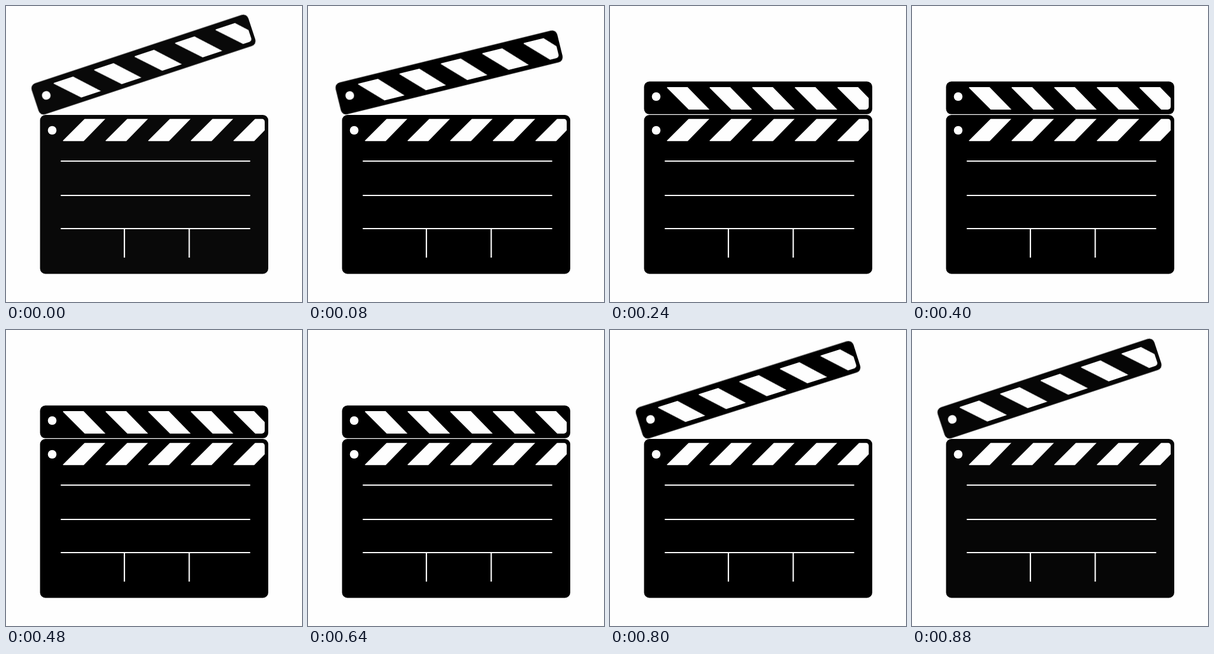
An HTML page without scripts that plays this animation: 500 px wide and 500 px high, repeating every 960 ms.

```html
<!DOCTYPE html>
<html lang="en">
<head>
<meta charset="utf-8">
<title>Clapperboard</title>
<style>
  html, body { margin: 0; width: 100%; height: 100%; overflow: hidden; background: #fefefe; }
  svg { display: block; width: 100%; height: 100%; }
  .board { fill: #000; animation: tone 960ms step-end infinite; }
  .white { fill: #fefefe; }
  .rules { fill: none; stroke: #fefefe; stroke-width: 2.2; }
  .arm { transform-origin: 66.8px 183px; animation: clap 960ms step-end infinite; }

  @keyframes clap {
    0%       { transform: rotate(-18.3deg); }
    8.3333%  { transform: rotate(-13.8deg); }
    16.6667% { transform: translateY(-.8px); }
    25%      { transform: none; }
    75%      { transform: rotate(-14.2deg); }
    83.3333% { transform: rotate(-17.6deg); }
    91.6667%, 100% { transform: rotate(-18.3deg); }
  }
  @keyframes tone {
    0%       { fill: #090909; }
    8.3333%  { fill: #000; }
    91.6667%, 100% { fill: #060606; }
  }
</style>
</head>
<body>
<svg viewBox="0 0 500 500">
  <defs>
    <clipPath id="inset"><rect x="90" y="137" width="347" height="38" rx="5"/></clipPath>
    <path id="stripe" d="M97 137H131L168 175H133L96 138Z"/>
    <g id="stripes" class="white" clip-path="url(#inset)">
      <use href="#stripe"/>
      <use href="#stripe" x="72"/>
      <use href="#stripe" x="144"/>
      <use href="#stripe" x="216"/>
      <use href="#stripe" x="288"/>
    </g>
  </defs>

  <g class="board">
    <rect x="57.5" y="184" width="385.5" height="268.5" rx="9"/>
    <use href="#stripes" transform="matrix(1 0 0 -1 0 365.5)"/>
    <circle class="white" cx="78" cy="210" r="7.3"/>
    <path class="rules" d="M92.5 262H412.5M92.5 320H412.5M92.5 376H412.5M200 376V425M309.5 376V425"/>
    <g class="arm">
      <rect x="57.5" y="127.5" width="385.5" height="55.3" rx="9"/>
      <use href="#stripes"/>
      <circle class="white" cx="78" cy="153" r="7.3"/>
    </g>
  </g>
</svg>
</body>
</html>
```
